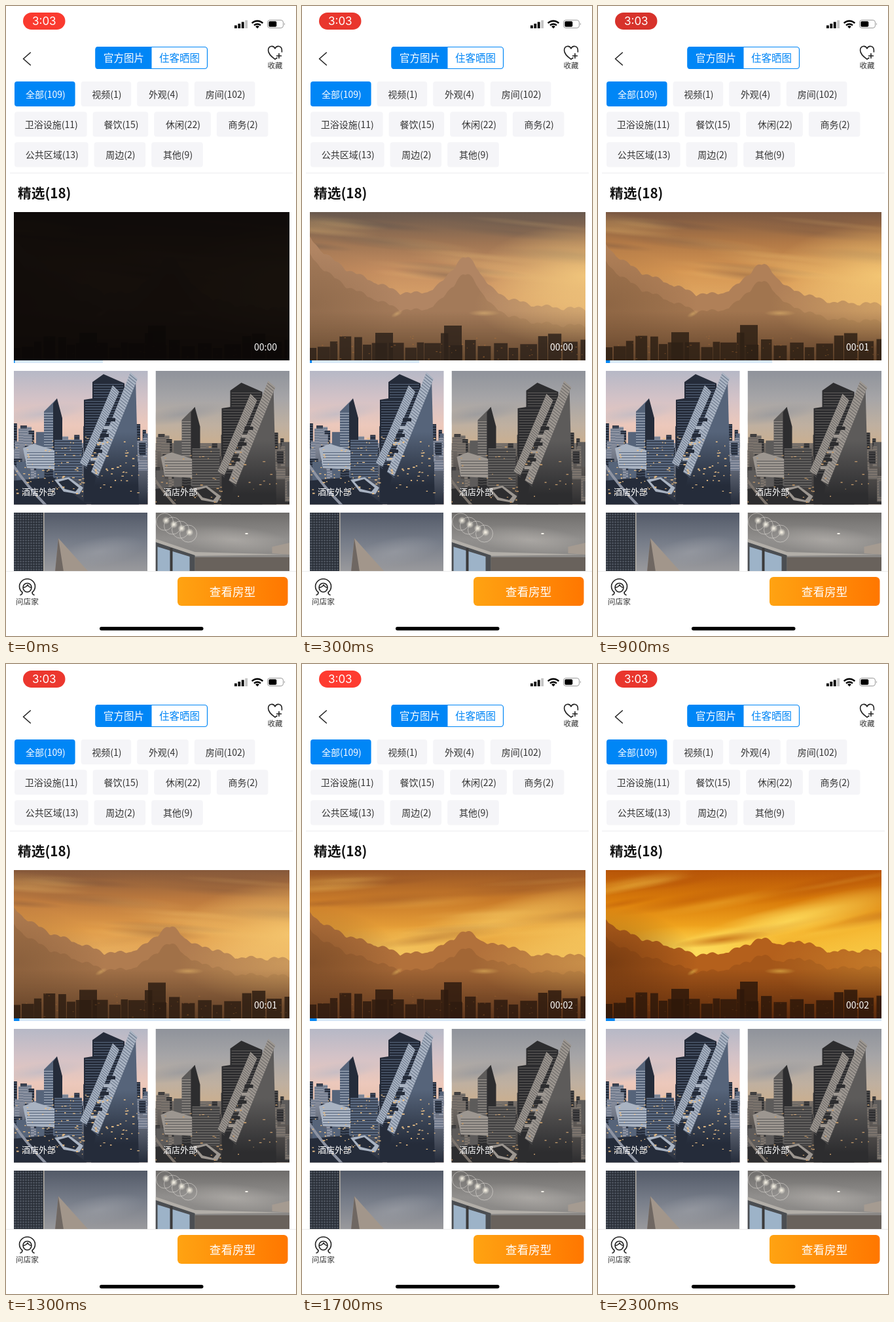
Animation of 443x960 px, one loop 2.4 s. Source, as an HTML page with a canvas:

```html
<!DOCTYPE html>
<html lang="zh">
<head>
<meta charset="utf-8">
<title>酒店图片</title>
<style>
html, body { margin: 0; width: 100%; height: 100%; overflow: hidden; background: #fff; }
canvas, svg { position: absolute; left: 0; top: 0; width: 443px; height: 960px; }
text { font-family: "Noto Sans CJK SC", "Noto Sans CJK", "Noto Sans", sans-serif; }
.mid { text-anchor: middle; }
.line { fill: none; stroke: #222; stroke-width: 1.6; stroke-linecap: round; stroke-linejoin: round; }
</style>
</head>
<body>
<canvas id="photos" width="443" height="960"></canvas>
<canvas id="video" width="443" height="960"></canvas>
<svg viewBox="0 0 443 960">
  <defs>
    <linearGradient id="orange">
      <stop offset="0" stop-color="#ffa312"/><stop offset="1" stop-color="#ff7700"/>
    </linearGradient>
  </defs>

  <rect id="pill" x="26" y="10" width="64.5" height="26" rx="13"/>
  <text class="mid" x="58.3" y="29" font-size="17" fill="#fff" style="font-family:Inter,sans-serif">3:03</text>
  <g id="signal"></g>
  <g fill="none" stroke="#000" stroke-width="2.5">
    <path d="M375.7 26.2a11.6 11.6 0 0 1 16.6 0"/><path d="M379 29.5a7 7 0 0 1 10 0"/>
  </g>
  <path d="M384 34.3l-2.9-3a4.2 4.2 0 0 1 5.8 0z"/>
  <rect x="399.5" y="21.5" width="24" height="12" rx="3.6" fill="none" stroke="#999"/>
  <path d="M425 25.5q2 2 0 4z" fill="#999"/>
  <rect x="401.3" y="23.3" width="12" height="8.4" rx="1.8"/>

  <path class="line" d="M37.3 71L26.5 80.5 37.3 90"/>
  <rect x="137" y="62.5" width="170.5" height="33" rx="4" fill="#fff" stroke="#0086f6" stroke-width="1.2"/>
  <path d="M222.500 62v34h-82a4 4 0 0 1-4-4V66a4 4 0 0 1 4-4z" fill="#0086f6"/>
  <g class="mid" font-size="15.5">
    <text x="180" y="85" fill="#fff">官方图片</text>
    <text x="265" y="85" fill="#0086f6">住客晒图</text>
  </g>
  <path class="line" d="M414 79l-3 2.2C404 76 400.6 72.5 400.6 67.5c0-7 8-8 10.4-2.7 2.4-5.3 10.4-4.3 10.4 2.7V70M413.5 76h7M417 72.5v7"/>
  <text class="mid" x="411" y="95" font-size="11.5" fill="#333">收藏</text>

  <g id="chips" class="mid" font-size="14"></g>
  <path d="M6 254.5H438" stroke="#ececef"/>
  <text x="18" y="292.5" font-size="20.7" font-weight="700" fill="#111">精选(18)</text>

  <text id="clock" x="414" y="525" font-size="14" text-anchor="end" fill="#fff"></text>
  <rect id="buffer" x="12" y="540" height="4" fill="#d8e9fa"/>
  <rect id="played" x="12" y="540" height="4" fill="#0086f6"/>
  <g font-size="13" fill="#fff">
    <text x="24" y="745">酒店外部</text><text x="240" y="745">酒店外部</text>
  </g>

  <rect y="861" width="443" height="99" fill="#fff"/>
  <path d="M0 861.5H443" stroke="#ececec"/>
  <g class="line">
    <path d="M22 897.5q3-1 3-4a12 11.500 0 1 1 15 0q0 3 3 4"/>
    <path d="M26 886q5 0 7-4 2 4 6 4a6.500 7 0 0 1-13 0a6.500 6.500 0 0 1 13 0"/>
  </g>
  <text class="mid" x="32.3" y="911.5" font-size="11.7" fill="#333">问店家</text>
  <rect x="262" y="870" width="168.5" height="44" rx="6" fill="url(#orange)"/>
  <text class="mid" x="346" y="898.5" font-size="17.6" fill="#fff">查看房型</text>
  <rect x="143" y="946" width="158.5" height="5.5" rx="2.75"/>
</svg>
<script>
const LOOP = 2400, STEP = 100;
const $ = id => document.getElementById(id);
const mix = (a, b, k) => a + (b - a) * k;
const clamp = k => Math.min(1, Math.max(0, k));
const rgb = hex => [1, 3, 5].map(i => parseInt(hex.slice(i, i + 2), 16));
const css = c => `rgb(${c.map(Math.round)})`;
const range = n => [...Array(n).keys()];

function seeded(seed) {
  return () => (seed = (seed * 16807) % 2147483647) / 2147483647;
}

// ---- interface
$('signal').innerHTML = range(4).map(i => {
  const h = 4.5 + i * 2.6;
  return `<rect x="${349 + i * 5.4}" y="${34 - h}" width="3.8" height="${h}" fill="${i < 3 ? '#000' : '#c4c4c4'}"/>`;
}).join('');

const labels = [
  '全部(109) 视频(1) 外观(4) 房间(102)',
  '卫浴设施(11) 餐饮(15) 休闲(22) 商务(2)',
  '公共区域(13) 周边(2) 其他(9)'
];
const charWidth = ch => '()'.includes(ch) ? 4.8 : ch === '1' ? 6 : ch <= '9' ? 8 : 14;

$('chips').innerHTML = labels.map((line, r) => {
  let x = 13;
  const y = 115 + r * 46.3;
  return line.split(' ').map((label, i) => {
    const on = !r && !i, left = x;
    const w = 33 + [...label].reduce((sum, ch) => sum + charWidth(ch), 0);
    x += w + 9;
    return `<rect x="${left}" y="${y}" width="${w}" height="38" rx="4" fill="${on ? '#0086f6' : '#f5f5f8'}"/>
      <text x="${left + w / 2 + 1}" y="${y + 24.5}" fill="${on ? '#fff' : '#333'}">${label}</text>`;
  }).join('');
}).join('');

// ---- drawing helpers
function poly(c, fill, ...p) {
  c.fillStyle = fill;
  c.beginPath();
  for (let i = 0; i < p.length; i += 2) c.lineTo(p[i], p[i + 1]);
  c.fill();
}
function box(c, fill, x, y, w, h) {
  c.fillStyle = fill;
  c.fillRect(x, y, w, h);
}
function fade(c, y0, y1, ...colors) {
  const g = c.createLinearGradient(0, y0, 0, y1);
  colors.forEach((col, i) => g.addColorStop(i / (colors.length - 1), col));
  return g;
}
function glow(c, color, alpha, x, y, rx, ry, tilt = 0) {
  const g = c.createRadialGradient(0, 0, 0, 0, 0, 1), col = color.map(Math.round);
  g.addColorStop(0, `rgba(${col},${alpha})`);
  g.addColorStop(1, `rgba(${col},0)`);
  c.save();
  c.translate(x, y);
  c.rotate(tilt);
  c.scale(rx, ry);
  box(c, g, -1, -1, 2, 2);
  c.restore();
}
function framed(c, x, y, w, h, draw) {
  c.save();
  c.beginPath();
  c.rect(x, y, w, h);
  c.clip();
  c.translate(x, y);
  draw(c);
  c.restore();
}
function floors(c, color, x, y, w, h) {
  for (let dy = 2; dy < h; dy += 4) box(c, color, x, y + dy, w, 1);
}
// A strip that leans from its top left corner down to its foot.
function leaning(c, fill, rib, x, y, footX, footY, w) {
  poly(c, fill, x, y, x + w, y + 10, footX + w, footY + 6, footX, footY);
  for (let k = 0.02; k < 1; k += 0.025) {
    const px = mix(x, footX, k), py = mix(y, footY, k);
    poly(c, rib, px, py, px + w, py + 9, px + w, py + 10, px, py + 1);
  }
}

// ---- still photos
function city(c, p, dx, dy) {
  const rnd = seeded(41);
  box(c, fade(c, 0, 125, ...p.sky), 0, 0, 205, 204);
  glow(c, rgb(p.sky[0]), 0.6, 40, 66, 70, 14, -0.15);
  box(c, fade(c, 105, 204, p.far, p.dark), 0, 110, 205, 94);
  c.translate(dx, dy);

  for (let i = 0; i < 70; i++) {
    const y = 80 + i * 1.1, x = rnd() * 215 - 5, w = 5 + rnd() * 12, h = 15 + rnd() * 25;
    box(c, [p.far, p.mid, p.dark][Math.floor(rnd() * 3)], x, y, w, h);
    floors(c, p.mid, x, y, w, h);
  }
  poly(c, p.mid, 46, 62, 66, 42, 68, 135, 46, 135);
  floors(c, p.pale, 46, 62, 14, 73);
  poly(c, p.dark, 60, 50, 66, 42, 74, 72, 74, 135, 60, 135);
  poly(c, p.pale, 14, 118, 30, 111, 62, 121, 62, 150, 20, 148);
  floors(c, p.mid, 20, 122, 42, 26);
  box(c, p.mid, 62, 105, 42, 60);
  floors(c, p.dark, 62, 105, 42, 60);

  poly(c, p.dark, 107, 44, 120, 42, 120, 17, 137, 5, 169, 19, 169, 200, 107, 200);
  floors(c, p.mid, 109, 44, 58, 100);
  floors(c, p.mid, 122, 18, 45, 24);
  poly(c, fade(c, 10, 175, p.mid, p.mid, p.dark), 186, 10, 191, 204, 118, 204, 126, 156);
  leaning(c, p.pale, p.mid, 151, 22, 101, 140, 10);
  leaning(c, p.pale, p.mid, 178, 2, 118, 154, 11);
  for (let i = 0; i < 6; i++) box(c, i % 2 ? p.pale : p.dark, 142 - i * 5, 72 + i * 12, 13, 5);

  poly(c, p.dark, -10, 168, 60, 162, 125, 215, -10, 215);
  poly(c, p.pale, 62, 166, 84, 162, 106, 178, 100, 188, 76, 184);
  poly(c, p.dark, 68, 169, 83, 165, 99, 178, 94, 184, 78, 180);
  c.strokeStyle = p.far;
  c.lineWidth = 4;
  c.beginPath();
  c.moveTo(-10, 130);
  c.quadraticCurveTo(14, 170, 52, 208);
  c.stroke();
  for (let i = 0; i < p.lights; i++) {
    box(c, p.lamp, rnd() * 190, 100 + rnd() * 95, 1 + rnd() * 3, 1 + rnd());
  }
}

const dusk = {
  sky: ['#b6b8c6', '#d3c2c7', '#ecc8bb', '#e2bca8'],
  far: '#8d93a2', mid: '#56647a', dark: '#252c3a', pale: '#a9b3c2', lamp: '#e8be86', lights: 130
};
const evening = {
  sky: ['#8f939b', '#a6a5a7', '#bfb0a0', '#cfae88'],
  far: '#7c746d', mid: '#5d5b5a', dark: '#2d2d2f', pale: '#9c9690', lamp: '#c39a6b', lights: 50
};

function facade(c) {
  box(c, fade(c, 0, 90, '#535a68', '#777d89', '#9a9a9d'), 0, 0, 204, 90);
  glow(c, [158, 161, 168], 0.6, 130, 60, 70, 22, -0.2);
  box(c, '#343a44', 0, 0, 45, 90);
  floors(c, '#59606b', 0, 0, 45, 90);
  for (let x = 4; x < 45; x += 4) box(c, '#262b33', x, 0, 1, 90);
  box(c, '#b9b3aa', 45, 0, 1.5, 90);
  poly(c, '#a2968b', 68, 39, 114, 90, 63, 90);
  poly(c, '#6f6762', 68, 39, 76, 90, 63, 90);
}

function room(c) {
  box(c, fade(c, 0, 80, '#6f6d6b', '#918f8d', '#858381'), 0, 0, 205, 90);
  glow(c, [185, 181, 176], 0.6, 120, 42, 90, 22, 0.1);
  poly(c, '#b2aea8', 0, 40, 60, 60, 205, 64, 60, 66, 0, 45);
  poly(c, '#4b4e52', 0, 45, 60, 65, 60, 90, 0, 90);
  poly(c, '#9db3c8', 3, 52, 52, 67, 52, 90, 3, 90);
  box(c, '#3c3b3b', 22, 54, 4, 36);
  box(c, '#69625c', 60, 68, 145, 22);
  poly(c, '#a59b91', 178, 52, 205, 46, 205, 64, 178, 62);
  box(c, '#f4f1ea', 137, 31, 4, 2);
  c.strokeStyle = 'rgba(235,232,226,.5)';
  for (let i = 0; i < 4; i++) {
    const x = 14 + i * 12, y = 14 + i * 6;
    c.beginPath();
    c.arc(x, y, 13, 0, 7);
    c.stroke();
    glow(c, [255, 250, 236], 1, x + 2, y - 2, 6, 6);
  }
}

const still = $('photos').getContext('2d');
framed(still, 12, 556, 204.5, 203.5, c => city(c, dusk, 0, 0));
framed(still, 228.5, 556, 204.5, 203.5, c => city(c, evening, -6, 13));
framed(still, 12, 772, 204.5, 90, facade);
framed(still, 228.5, 772, 204.5, 90, room);

// ---- video: the palette warms up while the cloud bank sinks
const hues = ['sky', 'upper', 'lower', 'horizon', 'crest', 'base', 'sun'];
const palettes = [
  '#69594e #9d7453 #c68e60 #d59d66 #b18563 #65482f #f1c67c',
  '#85583a #bd7a3e #df9a48 #e4a95c #b07c50 #5e3e26 #f6c870',
  '#b65408 #d87a0a #f2a820 #f5bf3a #b4601c #5a2a0c #ffe060'
].map(p => p.split(' ').map(rgb));

function tint(k) {
  const i = k < 0.5 ? 0 : 1, f = k * 2 - i;
  const blend = (a, b) => a.map((v, j) => mix(v, b[j], f));
  return Object.fromEntries(hues.map((h, j) => [h, blend(palettes[i][j], palettes[i + 1][j])]));
}

// Height of the cloud crest: a shoulder on the left, two heads, and small billows.
function crest(x, k) {
  const hump = (at, width) => Math.exp(-(((x - at) / width) ** 2));
  const shoulder = mix(90, 52, k) * Math.exp(-(x - 12) / 75);
  const heads = mix(60, 20, k) * hump(251, 34) + mix(6, 16, k) * hump(312, 24);
  const billows = 5 * Math.abs(Math.sin(x / 13 + 1)) + 3 * Math.abs(Math.sin(x / 5.3));
  const slope = mix(18, -6, k) * clamp((x - 200) / 200);
  return 448 + 7 * hump(155, 35) + slope - shoulder - heads - billows;
}

function clouds(c, k, drop, fill) {
  const edge = range(212).flatMap(i => [12 + i * 2, crest(12 + i * 2, k) + drop]);
  poly(c, fill, 12, 545, ...edge, 434, 545);
}

function skyline(c, k, color) {
  const rnd = seeded(23);
  c.globalAlpha = 0.85;
  for (let x = 12; x < 433;) {
    const w = 10 + rnd() * 16;
    box(c, color, x, 521 - rnd() ** 2 * 26 - k * 3, w, 60);
    x += w + rnd() * 5;
  }
  box(c, color, 217, 487 - k * 3, 27, 60);
  box(c, color, 112, 498 - k * 3, 27, 60);
  c.globalAlpha = 0.5 * (1 - k * 0.7);
  for (let i = 0; i < 46; i++) box(c, '#c77d38', 14 + rnd() * 416, 502 + rnd() * 36, 1 + rnd() * 2, 1);
  c.globalAlpha = 1;
}

function drawVideo(c, t) {
  const k = clamp((t - 300) / 2000), p = tint(k), rnd = seeded(57);
  const fire = clamp((t - 1200) / 900);
  c.save();
  c.beginPath();
  c.rect(12, 314, 421, 226);
  c.clip();
  box(c, fade(c, 314, 450, css(p.sky), css(p.upper), css(p.lower), css(p.horizon)), 12, 314, 421, 226);
  for (let i = 0; i < 26; i++) {
    const light = i % 2, x = 12 + rnd() * 421 + t * 0.01, y = 318 + rnd() * 95;
    glow(c, light ? p.sun : p.sky, light ? 0.2 : 0.4, x, y, 60 + rnd() * 70, 5 + rnd() * 7, mix(0.1, -0.18, fire));
  }
  glow(c, p.sun, mix(0.95, 0.3, fire), 433, 412, 170, 80);
  glow(c, p.sun, mix(0.1, 0.9, fire), 150, 440, 150, 42);
  glow(c, p.sun, 0.8 * fire, 290, 392, 200, 26, -0.26);
  glow(c, p.sky, 0.65 * fire, 190, 420, 75, 9, -0.12);

  const body = fade(c, 390, 540, css(p.crest), css(p.crest), css(p.base));
  clouds(c, k, 0, body);
  c.globalAlpha = 0.18;
  clouds(c, k, 26, css(p.base));
  c.globalAlpha = 1;
  glow(c, p.base, mix(0.3, 0.6, fire), 12, 455, 140, 85);
  glow(c, p.sun, mix(0.55, 0.2, k), 433, 455, 170, 65);
  glow(c, p.sun, 0.45, 145, 469, 10, 4, -0.5);
  glow(c, p.sun, 0.45, 278, 468, 24, 5);

  skyline(c, k, css([46, mix(35, 24, k), mix(26, 10, k)]));
  c.globalAlpha = 0.94 * clamp(1 - t / 300);
  box(c, '#0a0706', 12, 314, 421, 226);
  c.restore();
}

const film = $('video').getContext('2d');
let shown = -1;
function tick() {
  const t = Math.floor(performance.now() % LOOP / STEP) * STEP;
  if (t !== shown) {
    shown = t;
    drawVideo(film, t);
    const pulse = 0.5 + 0.5 * Math.cos((t - 1780) / 1000 * Math.PI);
    $('pill').setAttribute('fill', css([mix(214, 255, pulse), mix(50, 59, pulse), mix(43, 48, pulse)]));
    $('clock').textContent = '00:0' + Math.floor((t + 400) / 1000);
    $('buffer').setAttribute('width', Math.min(421, 136 + t * 0.09 + t * t * 4.6e-5));
    $('played').setAttribute('width', 1.5 + t * 0.0053);
  }
  requestAnimationFrame(tick);
}
tick();
</script>
</body>
</html>
```
